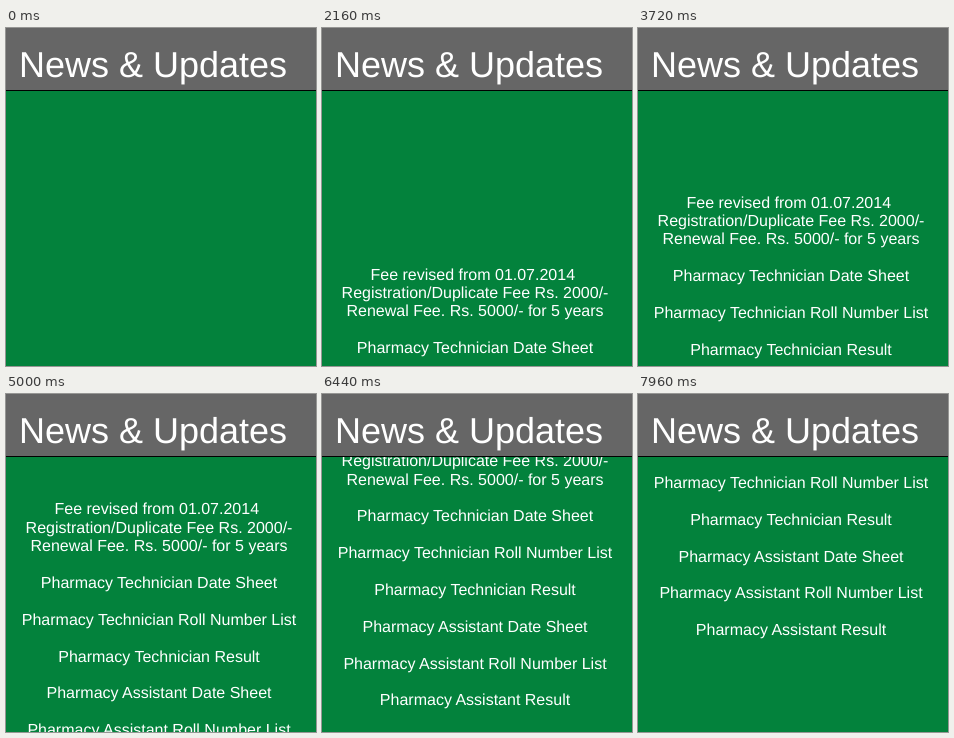
An HTML page with a canvas for the animation above (8 s loop, 310 px wide and 338 px high).

```html
<!DOCTYPE html>
<html lang="en">
<head>
<meta charset="utf-8">
<title>News &amp; Updates</title>
<style>
  html, body { margin: 0; width: 100%; height: 100%; overflow: hidden; background: #03823c; }
  canvas { display: block; }
</style>
</head>
<body>
<canvas id="stage" width="310" height="338"></canvas>
<script>
const ctx = document.getElementById('stage').getContext('2d');
const FONT = '"Liberation Sans", Arial, sans-serif';
const LOOP = 8000, STEP = 40;
const LINE_HEIGHT = 18.4, START_Y = 351.48, RISE_PER_STEP = 1.849;
const HEADER_HEIGHT = 62;

// The trailing space shifts the first line slightly left of centre.
const lines = [
  'Fee revised from 01.07.2014 ',
  'Registration/Duplicate Fee Rs. 2000/-',
  'Renewal Fee. Rs. 5000/- for 5 years',
  '',
  'Pharmacy Technician Date Sheet',
  '',
  'Pharmacy Technician Roll Number List',
  '',
  'Pharmacy Technician Result',
  '',
  'Pharmacy Assistant Date Sheet',
  '',
  'Pharmacy Assistant Roll Number List',
  '',
  'Pharmacy Assistant Result'
];

function rect(color, y, height) {
  ctx.fillStyle = color;
  ctx.fillRect(0, y, 310, height);
}

function text(string, size, x, y) {
  ctx.font = `${size}px ${FONT}`;
  ctx.fillStyle = '#fff';
  ctx.fillText(string, x - ctx.measureText(string).width / 2, y);
}

function draw(time) {
  const step = Math.floor((time % LOOP) / STEP);
  const top = START_Y - RISE_PER_STEP * step;
  ctx.textRendering = 'geometricPrecision';
  rect('#03823c', 0, 338);
  lines.forEach((line, i) => text(line, 16, 153, top + i * LINE_HEIGHT));
  rect('#666', 0, HEADER_HEIGHT);
  rect('#000', HEADER_HEIGHT, 1);
  text('News & Updates', 36, 147, 49);
}

const start = performance.now();
function tick() {
  draw(performance.now() - start);
  requestAnimationFrame(tick);
}
tick();
</script>
</body>
</html>
```
